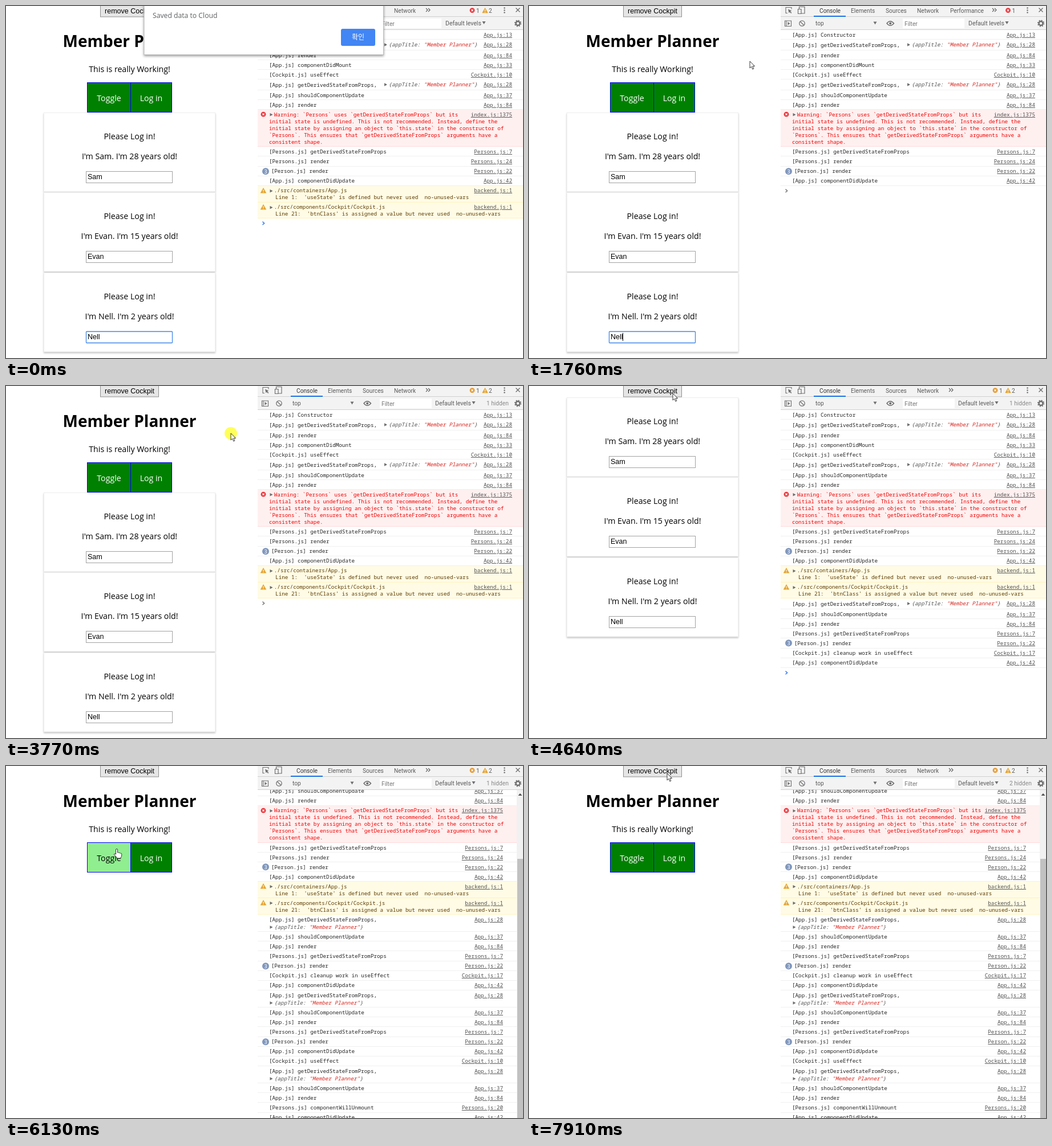
Recreate the animation shown at these times as an HTML page. Size 906 by 618 pixels, loop 7990 ms.

```html
<!DOCTYPE html>
<html lang="en">
<head>
<meta charset="utf-8">
<title>Console demo</title>
<style>
html, body { margin: 0; width: 100%; height: 100%; overflow: hidden; background: #fff; }
svg { display: block; }
text { white-space: pre; }
.page { font: 14.2px "Open Sans", "Noto Sans", sans-serif; }
.title { font: bold 28px "Open Sans", "Noto Sans", sans-serif; }
.form { font: 12.5px "Liberation Sans", Arial, sans-serif; }
.tool { font: 10.2px Roboto, sans-serif; fill: #5a5a5a; }
.mono { font: 9.27px "Noto Sans Mono", monospace; fill: #262626; }
.link { fill: #505050; text-decoration: underline; }
.note { font: 12.2px "Open Sans", "Noto Sans", sans-serif; fill: #5f6063; }
.ok { font: 12px "Noto Sans CJK KR", "Noto Sans CJK", sans-serif; fill: #fff; }
.mid { text-anchor: middle; }
.end { text-anchor: end; }
.card { fill: #fff; stroke: #eee; filter: drop-shadow(0 2px 1.5px #c4c4c4); }
.alert { fill: #fff; stroke: #bbb; filter: drop-shadow(0 2px 2px rgba(0,0,0,.4)); }
</style>
</head>
<body>
<script>
const LOOP = 7990;
const APP = 'Member Planner';
const PEOPLE = [['Sam', 28], ['Evan', 15], ['Nell', 2]];

function add(parent, tag, attrs = {}, text) {
  const node = document.createElementNS('http://www.w3.org/2000/svg', tag);
  for (const k in attrs) node.setAttribute(k, attrs[k]);
  if (text !== undefined) node.textContent = text;
  if (parent) parent.appendChild(node);
  return node;
}
const group = (p, attrs) => add(p, 'g', attrs);
const rect = (p, x, y, width, height, fill, more) => add(p, 'rect', { x, y, width, height, fill, ...more });
const path = (p, d, fill, more) => add(p, 'path', { d, fill, ...more });
const stroke = (p, d, color, w = 1) => path(p, d, 'none', { stroke: color, 'stroke-width': w });
const disc = (p, cx, cy, r, fill) => add(p, 'circle', { cx, cy, r, fill });
const label = (p, cls, x, y, str, more) => add(p, 'text', { class: cls, x, y, ...more }, str);
const show = (node, on) => { node.style.display = on ? '' : 'none'; };

const svg = add(document.body, 'svg', { width: 906, height: 618, viewBox: '0 0 906 618' });

// ---- web page ----
const page = group(svg);
rect(page, 165.5, -3, 102, 22, '#e6e6e6', { stroke: '#8f8f8f' });
label(page, 'form mid', 216.5, 13, 'remove Cockpit');

const cockpit = group(page);
label(cockpit, 'title mid', 216.5, 72, APP);
label(cockpit, 'page mid', 216.5, 115.5, 'This is really Working!');
const toggle = rect(cockpit, 142.5, 134.5, 76, 52, 'green', { stroke: '#00f' });
rect(cockpit, 218.5, 134.5, 72, 52, 'green', { stroke: '#00f' });
const toggleText = label(cockpit, 'page mid', 180.5, 167, 'Toggle', { fill: '#fff' });
label(cockpit, 'page mid', 254.5, 167, 'Log in', { fill: '#fff' });

const cards = group(page);
let field;
PEOPLE.forEach(([name, age], i) => {
  const g = group(cards, { transform: `translate(0 ${Math.round(i * 140.4)})` });
  rect(g, 66.5, 187.5, 300, 138.5, '#fff', { class: 'card' });
  label(g, 'page mid', 216.5, 234, 'Please Log in!');
  label(g, 'page mid', 216.5, 269, `I'm ${name}. I'm ${age} years old!`);
  field = rect(g, 140.5, 290.5, 151, 20, '#fff', { stroke: '#a2a2a2' });
  label(g, 'form', 143, 304, name);
});
const caret = rect(cards, 164, 574, 1, 14, '#000');

// ---- console rows ----
const LINE = 17.1, STEP = 12.1;
const GDS = 'getDerivedStateFromProps';
const row = (file, line, msg, kind = 'log') => ({ file, line, msg, kind });
const app = (line, msg) => row('App.js', line, msg);
const props = () => row('App.js', 28, GDS + ',', 'object');
const update = () => [app(37, 'shouldComponentUpdate'), app(84, 'render')];
const personsGet = () => row('Persons.js', 7, GDS);
const person = () => row('Person.js', 22, 'render', 'count');
const done = () => app(42, 'componentDidUpdate');
const effect = () => row('Cockpit.js', 10, 'useEffect');

const ROWS = [
  app(13, 'Constructor'), props(), app(84, 'render'), app(33, 'componentDidMount'),
  effect(), props(), ...update(),
  row('index.js', 1375, [
    'Warning: `Persons` uses `getDerivedStateFromProps` but its',
    'initial state is undefined. This is not recommended. Instead, define the',
    'initial state by assigning an object to `this.state` in the constructor of',
    '`Persons`. This ensures that `getDerivedStateFromProps` arguments have a',
    'consistent shape.'], 'error'),
  personsGet(), row('Persons.js', 24, 'render'), person(), done(),
  row('backend.js', 1, ['./src/containers/App.js',
    "  Line 1:  'useState' is defined but never used  no-unused-vars"], 'warn'),
  row('backend.js', 1, ['./src/components/Cockpit/Cockpit.js',
    "  Line 21:  'btnClass' is assigned a value but never used  no-unused-vars"], 'warn'),
  props(), ...update(), personsGet(), person(),
  row('Cockpit.js', 17, 'cleanup work in useEffect'), done(),
  props(), ...update(), personsGet(), person(),
  done(), effect(), props(), ...update(), row('Persons.js', 20, 'componentWillUnmount'), done()
];

const STYLE = {
  error: { bg: '#fff0f0', edge: '#ffd9d9', ink: '#f00000' },
  warn: { bg: '#fffbe5', edge: '#fff3bf', ink: '#5c3c00' }
};
const arrow = (p, x, y) => path(p, `M${x} ${y - 2.8}l5 2.8l-5 2.8z`, '#6e6e6e');

function errorIcon(p, x, y, fill = '#e8383d') {
  const dot = disc(p, x, y, 4.4, fill);
  stroke(p, `M${x - 1.7} ${y - 1.7}l3.4 3.4m0 -3.4l-3.4 3.4`, '#fff', 1.1);
  return dot;
}
function warnIcon(p, x, y) {
  path(p, `M${x} ${y - 4.6}l4.8 8.6h-9.6z`, '#e5a32e', { stroke: '#e5a32e', 'stroke-width': .6 });
  stroke(p, `M${x} ${y - 1.8}v3m0 1v1.2`, '#fff', 1.2);
}
function preview(p, x, y) {
  arrow(p, x, y - 3);
  const t = label(p, 'mono', x + 7.5, y, '', { style: 'font-style:italic' });
  add(t, 'tspan', { fill: '#565656' }, '{appTitle: ');
  add(t, 'tspan', { fill: '#d8261f' }, `"${APP}"`);
  add(t, 'tspan', { fill: '#565656' }, '}');
}

// Positions are snapped to whole pixels after the scroll offset is applied.
function buildRows(parent, wrap) {
  const right = wrap ? 871 : 887, width = wrap ? 454 : 465;
  const nodes = [], tops = [];
  let exact = wrap ? -93.7 : 42;
  for (const r of ROWS) {
    const g = group(parent);
    const look = STYLE[r.kind];
    const flat = r.kind === 'object' && !wrap;
    const h = look ? 4.6 + r.msg.length * STEP : r.kind === 'object' ? (wrap ? 30.4 : 18.8) : LINE;
    const y = Math.round(exact), bottom = Math.round(exact + h);
    const base = Math.round(exact + (flat ? 12.8 : 11.7));
    if (look) rect(g, 441, y, width, bottom - y, look.bg);
    rect(g, 441, bottom - 1, width, 1, look ? look.edge : '#f0f0f0');
    if (look) {
      (r.kind === 'error' ? errorIcon : warnIcon)(g, 451, y + 8.2);
      arrow(g, 462.5, y + 8.8);
      r.msg.forEach((s, i) =>
        label(g, 'mono', i ? 461 : 469.8, base + Math.round(i * STEP), s, { style: `fill:${look.ink}` }));
    } else {
      const count = r.kind === 'count';
      if (count) {
        disc(g, 455, y + 8.3, 6, '#8097bd');
        label(g, 'mono mid', 455, y + 11.6, '3', { style: 'fill:#fff' });
      }
      label(g, 'mono', count ? 464.7 : 461, base, `[${r.file}] ${r.msg}`);
      if (r.kind === 'object') wrap ? preview(g, 462.5, base + 13) : preview(g, 663, base - 1);
    }
    label(g, 'mono link end', right, base - (flat ? 1 : 0), `${r.file}:${r.line}`);
    nodes.push(g);
    tops.push(y);
    exact += h;
  }
  return { nodes, tops };
}

rect(svg, 441, 0, 465, 618, '#fff');
const flatView = group(svg);
const flatRows = buildRows(flatView, false);
const prompt = group(flatView);
const chevron = stroke(prompt, 'M449.5 5.6l3.2 2.8l-3.2 2.8', '#367cf1', 1.4);

const clip = add(add(svg, 'defs'), 'clipPath', { id: 'log' });
rect(clip, 441, 42, 465, 576);
const wrapView = group(svg, { 'clip-path': 'url(#log)' });
buildRows(wrapView, true);
rect(wrapView, 895, 42, 11, 576, '#f1f1f1');
rect(wrapView, 896, 163, 10, 455, '#c1c1c1');
path(wrapView, 'M897.5 52l3.5 -4l3.5 4z', '#505050');

// ---- console toolbar ----
const bar = group(svg);
rect(bar, 441, 0, 465, 42, '#f3f3f3');
rect(bar, 441, 18, 465, 1, '#d0d0d0');
rect(bar, 441, 41, 465, 1, '#d0d0d0');
rect(bar, 499, 17, 56, 2, '#1a73e8');
stroke(bar, 'M453 12.5h-3v-10h10v3', '#6e6e6e', 1.1);
path(bar, 'M454 5.5l6.5 3l-2.6 .8l2.5 2.6l-1.2 1.1l-2.4 -2.6l-1.2 2.2z', '#6e6e6e');
stroke(bar, 'M473.5 5v-3.5h9.5v11.5h-5.5M471.5 5.5h5.5v8h-5.5z', '#6e6e6e', 1.2);
[['Console', 509], ['Elements', 564], ['Sources', 625], ['Network', 680]].forEach(([s, x], i) =>
  label(bar, 'tool', x, 12, s, i ? {} : { style: 'fill:#333' }));
const more = (p, x) => stroke(p, `M${x} 4l3 3l-3 3m4 -6l3 3l-3 3`, '#5f5f5f', 1.2);
for (const y of [3.5, 7.5, 11.5]) disc(bar, 873.5, y, 1.2, '#6e6e6e');
stroke(bar, 'M893.5 3.5l7 7m0 -7l-7 7', '#6e6e6e', 1.4);

stroke(bar, 'M448.5 26h11v9.5h-11zM451 26v9.5', '#6e6e6e', 1.1);
path(bar, 'M453.5 28v5.5l4 -2.75z', '#6e6e6e');
stroke(bar, 'M473.8 30.5a4.7 4.7 0 1 0 9.4 0a4.7 4.7 0 1 0 -9.4 0M475.2 27.2l6.6 6.6', '#6e6e6e', 1.3);
label(bar, 'tool', 502, 34, 'top');
const down = (p, x, y) => path(p, `M${x} ${y}h6l-3 5z`, '#6e6e6e');
down(bar, 603.5, 27.5);
stroke(bar, 'M627 30.5q6 -7.5 12.5 0q-6.5 7.5 -12.5 0z', '#6e6e6e', 1.4);
disc(bar, 633.2, 30.5, 2.1, '#6e6e6e');
const ring = (r, w, dash) => add(bar, 'circle',
  { cx: 897, cy: 30.5, r, fill: 'none', stroke: '#6e6e6e', 'stroke-width': w, 'stroke-dasharray': dash });
ring(3.5, 2.4, 'none');
ring(5.3, 1.6, '2.1 2.06');

const filter = rect(bar, 655, 22, 108, 17, '#fff');
label(bar, 'tool', 658, 35, 'Filter', { style: 'fill:#777' });
const levels = group(bar);
label(levels, 'tool', 752, 34, 'Default levels', { style: 'font-size:10.5px' });
down(levels, 816.5, 27);
const hidden = label(bar, 'tool', 842, 34, '', { style: 'fill:#888' });

const shortBar = group(bar);
more(shortBar, 736);
const badge = errorIcon(shortBar, 817, 7.6);
label(shortBar, 'tool', 824, 12, '1');
warnIcon(shortBar, 839.5, 8);
label(shortBar, 'tool', 846, 12, '2');
const longBar = group(bar);
label(longBar, 'tool', 738, 12, 'Performance');
more(longBar, 812);
const loneBadge = group(longBar);
errorIcon(loneBadge, 839.5, 7.6);
label(loneBadge, 'tool', 846.5, 12, '1');

// ---- dialog and pointer ----
const dialog = group(svg);
rect(dialog, 242, -12, 419.5, 97.5, '#fff', { class: 'alert' });
label(dialog, 'note', 257, 21, 'Saved data to Cloud');
rect(dialog, 587, 40, 60, 30, '#4285f4', { rx: 3 });
label(dialog, 'ok mid', 617, 59, '확인');

const pointer = group(svg);
const halo = disc(pointer, 0, 0, 11, '#ffff3c');
halo.setAttribute('opacity', .85);
const ink = { stroke: '#222', 'stroke-width': .9, 'stroke-linejoin': 'round' };
const tip = path(pointer, 'M0 0V12L2.8 9.4L4.8 14L6.8 13.1L4.9 8.7H8.6Z', '#fff', ink);
const hand = path(pointer, 'M-1.5 9V1a1.5 1.5 0 0 1 3 0V6q2 -1 2.6 .7q2 -1 2.6 .7q2 -.6 2 1.2V11q0 2 -1.5 3.5V16H0V14.5L-4.6 9.5q0 -2 1.6 -1.2z', '#fff', ink);

// ---- timeline ----
const MOVES = [
  [70, 800, 583], [130, 725, 330], [200, 645, 110], [270, 582, 12], [440, 582, 12],
  [650, 612, 54], [910, 612, 54], [1150, 387, 97], [2790, 387, 97], [3120, 612, 54],
  [3470, 612, 54], [3690, 394, 83], [3870, 394, 83], [4250, 252, 13], [5750, 252, 13],
  [6120, 194, 146], [6620, 194, 146], [6960, 612, 54], [7400, 612, 54], [7830, 242, 13]
];
const CLICKS = [[840, 910], [1220, 1290], [3400, 3470], [3700, 3870], [4340, 4430], [5110, 5280], [7290, 7370]];
const ALERTS = [[0, 980], [2790, 3540], [6300, 7450]];
const ROW_COUNT = [[0, 15], [1530, 0], [1680, 13], [2020, 15], [4500, 22], [5280, 27]];
const HIDDEN = [[0, 0], [910, 1], [1530, 0], [3470, 1], [7370, 2]];

const within = (t, spans) => spans.some(([a, b]) => t >= a && t < b);
const latest = (t, steps) => steps.filter(s => s[0] <= t).pop()[1];

function place(t) {
  const i = MOVES.findIndex(m => m[0] > t);
  if (i < 0) return MOVES[MOVES.length - 1].slice(1);
  if (i === 0) return MOVES[0].slice(1);
  const a = MOVES[i - 1], b = MOVES[i];
  const u = (t - a[0]) / (b[0] - a[0]), e = u * u * (3 - 2 * u);
  return [a[1] + (b[1] - a[1]) * e, a[2] + (b[2] - a[2]) * e];
}

function draw(t) {
  const blank = within(t, [[1530, 1680]]);
  const bare = within(t, [[4430, 5280]]);
  show(page, !blank);
  show(cockpit, !bare);
  show(cards, t < 5280);
  cards.setAttribute('transform', `translate(0 ${bare ? -167 : 0})`);

  const focus = within(t, [[0, 980], [1680, 3540]]);
  field.setAttribute('stroke', focus ? '#3f86e8' : '#a2a2a2');
  field.setAttribute('stroke-width', focus ? 1.3 : 1);
  field.setAttribute('rx', focus ? 1 : 0);
  show(caret, within(t, [[1760, 2240], [2720, 2790]]));
  const hover = within(t, [[6060, 7450]]);
  toggle.setAttribute('fill', hover ? 'lightgreen' : 'green');
  toggleText.setAttribute('fill', hover ? '#000' : '#fff');

  const rows = latest(t, ROW_COUNT);
  flatRows.nodes.forEach((n, i) => show(n, i < rows));
  prompt.setAttribute('transform', `translate(0 ${flatRows.tops[rows]})`);
  chevron.setAttribute('stroke', within(t, [[1530, 4340]]) ? '#777' : '#367cf1');
  show(flatView, t < 5350);
  show(wrapView, t >= 5350);

  const n = latest(t, HIDDEN);
  const loading = within(t, [[1530, 2020]]);
  hidden.textContent = n ? `${n} hidden` : '';
  filter.setAttribute('width', n ? 91 : 108);
  levels.setAttribute('transform', `translate(${n ? 0 : 18} 0)`);
  show(longBar, loading);
  show(shortBar, !loading);
  show(loneBadge, !blank);
  badge.setAttribute('fill', t < 2020 ? '#e8383d' : '#e39a35');

  show(dialog, within(t, ALERTS));
  show(pointer, t >= 70);
  show(halo, within(t, CLICKS));
  const pointing = within(t, [[6060, 6450]]);
  show(hand, pointing);
  show(tip, !pointing);
  pointer.setAttribute('transform', `translate(${place(t)})`);
}

const start = performance.now();
function tick() {
  draw((performance.now() - start) % LOOP);
  requestAnimationFrame(tick);
}
tick();
</script>
</body>
</html>
```
